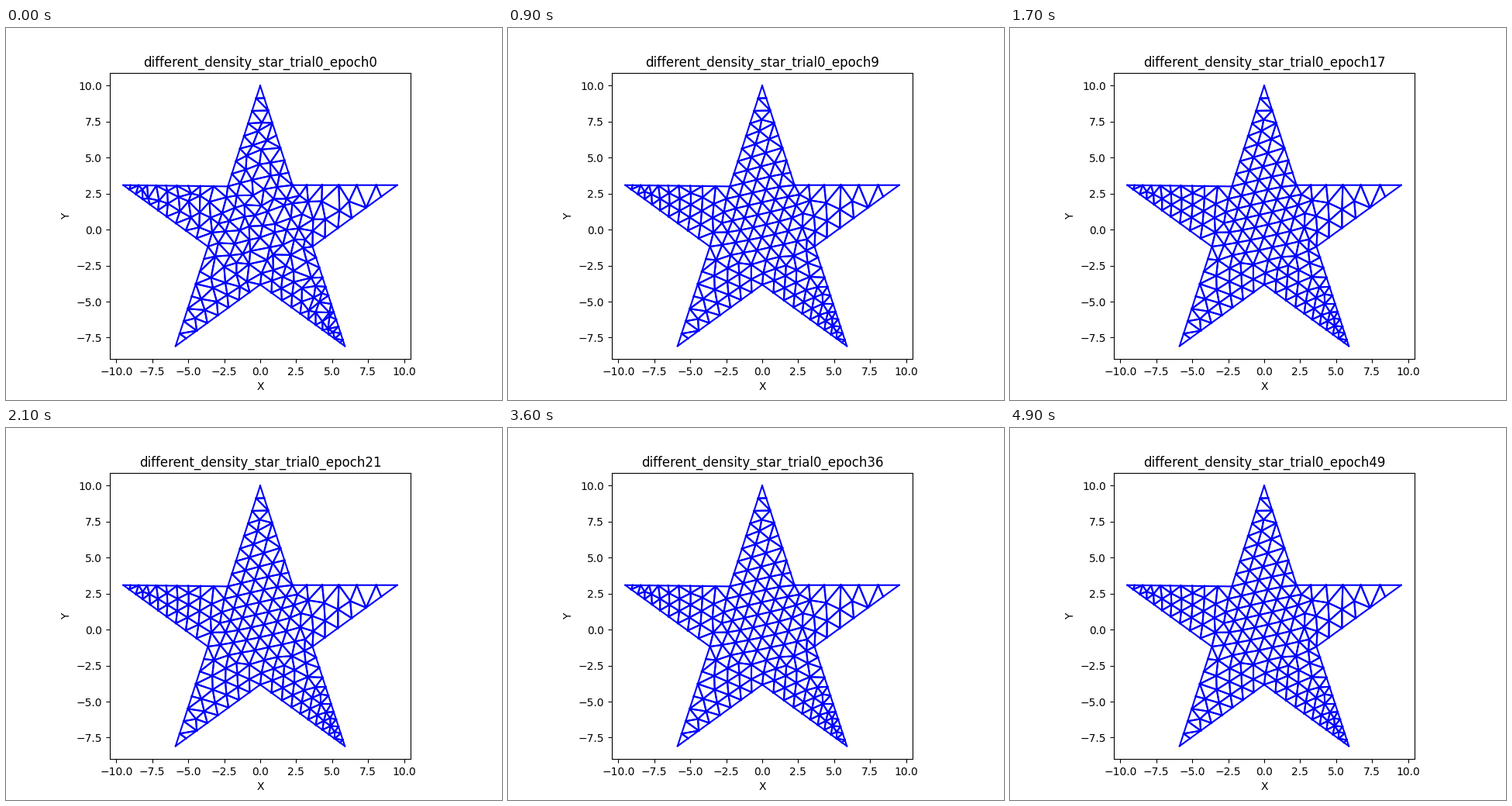
Recreate the animation shown at these times as a matplotlib script. Size 640 by 480 pixels, loop 5 s.

```python
import numpy as np
import matplotlib.pyplot as plt
from matplotlib.animation import FuncAnimation
from matplotlib.collections import LineCollection
from matplotlib.path import Path
from matplotlib.tri import Triangulation

FRAMES, INTERVAL = 50, 100
CORE_SPACING = 0.89
CORE_TILT = 12.6  # degrees


def polar(radius, degrees):
    a = np.radians(degrees)
    return np.array([radius * np.cos(a), radius * np.sin(a)])


def graded(n, ratio):
    """Fractions 0..1 whose steps change by a constant ratio."""
    return np.r_[0, np.cumsum(ratio ** np.arange(n))] / np.sum(ratio ** np.arange(n))


def lerp(a, b, t):
    return a + (b - a) * np.asarray(t)[:, None]


# Star corners, clockwise from the top; the upper left notch sits a bit low.
corners = [polar((10, 3.82)[i % 2], 90 - 36 * i) for i in range(10)]
corners[9] = np.array([-2.25, 3.0])


def side(notch, tip, n, ratio=1.0):
    return lerp(corners[notch], corners[tip], graded(n, ratio))


# Both sides of each arm, from notch to tip.
arms = [
    (side(1, 0, 8), side(9, 0, 8)),
    (side(1, 2, 6, 1.08), side(3, 2, 6, 1.05)),
    (side(3, 4, 12, 0.95), side(5, 4, 11, 0.92)),
    (side(7, 6, 8), side(5, 6, 8)),
    (side(9, 8, 10, 0.93), side(7, 8, 10, 0.93)),
]


def rungs(a, b):
    """Nodes on slanted lines between the two sides of an arm."""
    for i in range(1, min(len(a), len(b)) - 1):
        start, end = a[i], b[i - 1]
        gap = np.hypot(*(a[i] - a[i - 1])) / 2 + np.hypot(*(b[i] - b[i - 1])) / 2
        n = int(round(np.hypot(*(end - start)) / gap - 0.1))
        if n > 1:
            yield lerp(start, end, np.arange(1, n) / n)


def core_nodes(taken):
    """Tilted triangular lattice in the middle, clear of the nodes in place."""
    i, j = (g.ravel()[:, None] for g in np.mgrid[-15:16, -15:16])
    grid = corners[9] + CORE_SPACING * (
        i * polar(1, CORE_TILT) + j * polar(1, CORE_TILT - 60))
    grid = grid[Path(corners[1::2]).contains_points(grid)]
    dist = np.hypot(*(grid[:, None] - taken[None]).transpose(2, 0, 1))
    return grid[dist.min(axis=1) > 0.63 * CORE_SPACING]


border = np.unique(np.vstack([s for arm in arms for s in arm]).round(6), axis=0)
nb = len(border)
nodes = np.vstack([border] + [row for a, b in arms for row in rungs(a, b)])
nodes = np.vstack([nodes, core_nodes(nodes)])
outline = Path(corners)


def mesh_edges(p):
    """Edges of all triangles inside the star; shared edges occur twice."""
    tri = Triangulation(p[:, 0], p[:, 1]).triangles
    a, b, c = p[tri[:, 0]], p[tri[:, 1]], p[tri[:, 2]]
    u, v = b - a, c - a
    area = np.abs(u[:, 0] * v[:, 1] - u[:, 1] * v[:, 0]) / 2
    tri = tri[outline.contains_points((a + b + c) / 3) & (area > 0.01)]
    return np.vstack([tri[:, [0, 1]], tri[:, [1, 2]], tri[:, [2, 0]]])


def smoother(edges):
    """Matrix that moves each inner node to the mean of its neighbours."""
    w = np.zeros((len(nodes), len(nodes)))
    w[edges[:, 0], edges[:, 1]] = w[edges[:, 1], edges[:, 0]] = 1
    w[:nb] = np.eye(nb, len(nodes))
    return w / np.maximum(w.sum(axis=1, keepdims=True), 1)


for _ in range(4):
    step = smoother(mesh_edges(nodes))
    for _ in range(3):
        nodes = step @ nodes
edges = mesh_edges(nodes)
step = smoother(edges)
for _ in range(60):
    nodes = step @ nodes

# Start from a shaken mesh and let it relax.
rng = np.random.default_rng(4)
nodes[nb:] += rng.normal(0, 0.11, nodes[nb:].shape)
states = [nodes]
while len(states) < FRAMES:
    states.append((states[-1] + step @ states[-1]) / 2)

fig, ax = plt.subplots(figsize=(6.4, 4.8), dpi=100)
ax.set_aspect("equal", adjustable="box")
lo, hi = border.min(axis=0), border.max(axis=0)
pad = 0.05 * (hi - lo)
ax.set_xlim(lo[0] - pad[0], hi[0] + pad[0])
ax.set_ylim(lo[1] - pad[1], hi[1] + pad[1])
ax.set_xticks(np.arange(-10, 10.1, 2.5))
ax.set_yticks(np.arange(-7.5, 10.1, 2.5))
ax.set_xlabel("X")
ax.set_ylabel("Y")
title = ax.set_title("")
mesh = LineCollection([], colors="blue", linewidths=1.5, capstyle="projecting")
ax.add_collection(mesh, autolim=False)


def draw(epoch):
    mesh.set_segments(states[epoch][edges])
    title.set_text(f"different_density_star_trial0_epoch{epoch}")
    return mesh, title


anim = FuncAnimation(fig, draw, frames=FRAMES, interval=INTERVAL,
                     repeat=True, repeat_delay=0)
plt.show()
```
